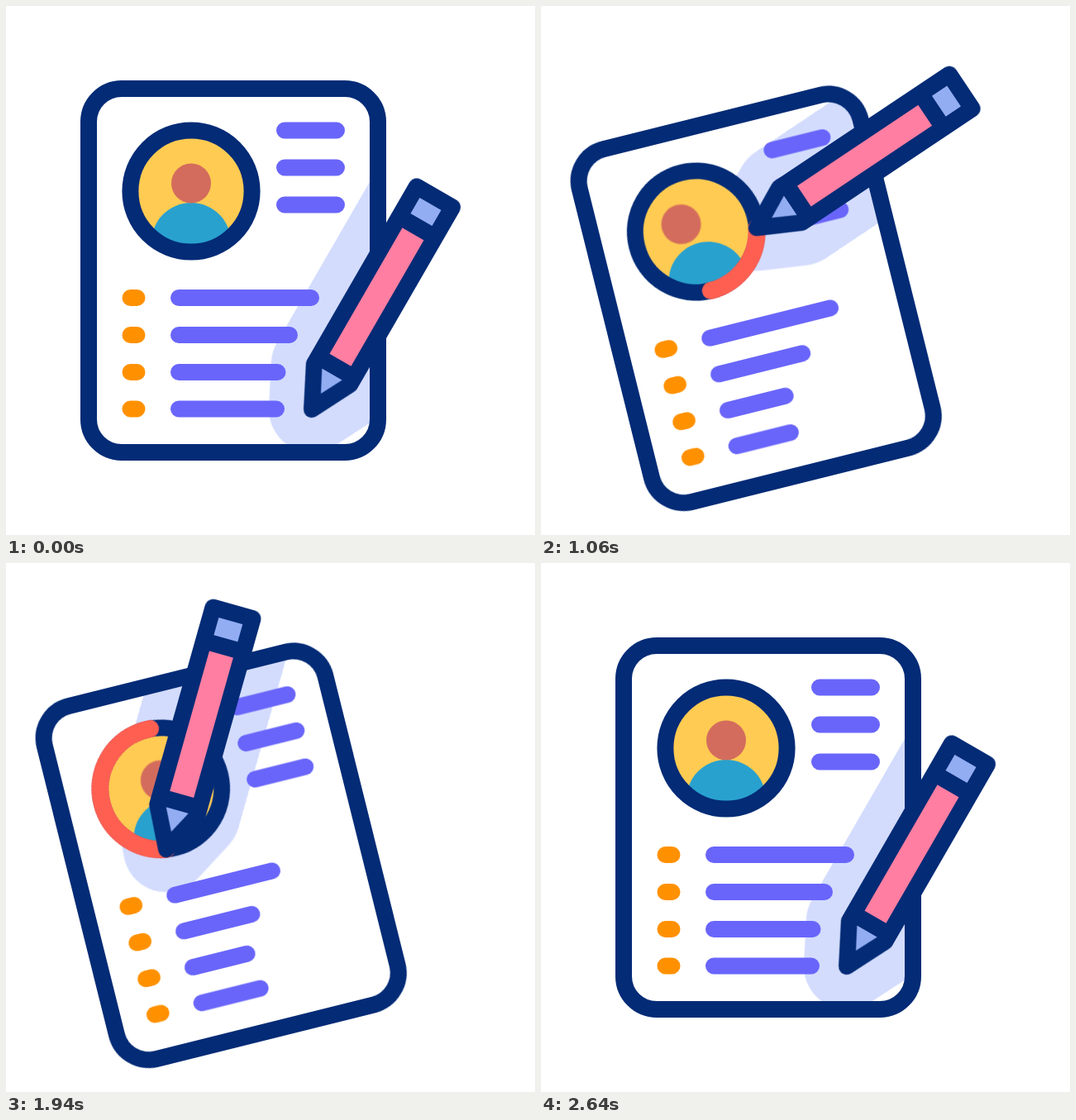
An HTML page that plays this animation: 640 px wide and 640 px high, repeating every 3000 ms.

```html
<!DOCTYPE html>
<html lang="en">
<head>
<meta charset="utf-8">
<title>Editing a profile</title>
<style>
  html, body { margin: 0; width: 100%; height: 100%; overflow: hidden; background: #fff; }
  svg { display: block; width: 100vw; height: 100vh; }

  :root { --navy: #032b76; --shade: #d3dcfd; }
  .line { fill: none; stroke-width: 20; stroke-linecap: round; }
  .ink { stroke: var(--navy); }
  .bars { stroke: #6965fa; }
  .dots { stroke: #ff9100; }
  .trace { stroke: #ff5f51; stroke-width: 21; }
  .pen-body { fill: var(--navy); stroke: var(--navy); stroke-width: 20; stroke-linejoin: round; }
  .pen-shade { fill: var(--shade); stroke: var(--shade); stroke-width: 104; stroke-linejoin: round; }

  .page, .unpage, .head, .tilt, .bars .long {
    animation: 3s cubic-bezier(.333, 0, .667, 1) infinite;
  }
  .leg, .orbit, .unorbit { animation: 3s linear infinite; }

  /* sheet tilt, and its exact inverse for the shadow inside it */
  .page, .unpage { transform-origin: 275px 320px; }
  .page { animation-name: page; }
  .unpage { animation-name: unpage; }
  @keyframes page {
    0%, 6.667%, 87.33%, 100% { transform: translate(0px, 0px) rotate(0deg); }
    23.333%, 70% { transform: translate(-14.8px, 33.8px) rotate(-14deg); }
  }
  @keyframes unpage {
    0%, 6.667%, 87.33%, 100% { transform: rotate(0deg) translate(0px, 0px); }
    23.333%, 70% { transform: rotate(14deg) translate(14.8px, -33.8px); }
  }

  .head { animation-name: head; }
  @keyframes head {
    0%, 6.667%, 68.33%, 100% { transform: translate(0px, 0px); }
    23.333% { transform: translate(-1.8px, -23px); }
    36% { transform: translate(-15.4px, -3.4px); }
    53.333% { transform: translate(12.4px, -4.6px); }
  }

  /* pencil: straight in, once round the ring, straight out */
  .leg { animation-name: leg; }
  .orbit { animation-name: orbit; }
  .unorbit { animation-name: unorbit; }
  .tilt { animation-name: tilt; }
  @keyframes leg {
    0%, 6.667% { transform: translate(162.8px, 144.1px); }
    26.93%, 65.67% { transform: translate(0px, 0px); }
    88%, 100% { transform: translate(164.7px, 143.6px); }
  }
  @keyframes orbit {
    0%, 26.93% { transform: rotate(74.5deg); }
    65.67%, 100% { transform: rotate(-284deg); }
  }
  @keyframes unorbit {
    0%, 26.93% { transform: rotate(-74.5deg); }
    65.67%, 100% { transform: rotate(284deg); }
  }
  @keyframes tilt {
    0%, 6.667% { transform: rotate(30deg); }
    26.93% { transform: rotate(53deg); }
    46.667% { transform: rotate(61.3deg); }
    65.67% { transform: rotate(15.4deg); }
    88%, 100% { transform: rotate(30deg); }
  }

  /* red stroke: the end follows the pencil, the start catches up later */
  .trace { animation: trace 3s linear infinite, show 3s step-end infinite; }
  @keyframes trace {
    0%, 26.93% { stroke-dasharray: .4px, 200px; stroke-dashoffset: 0px; }
    43.333% { stroke-dasharray: 42.6px, 200px; stroke-dashoffset: 0px; }
    65.67% { stroke-dasharray: 48.9px, 200px; stroke-dashoffset: -51.1px; }
    87%, 100% { stroke-dasharray: 0px, 200px; stroke-dashoffset: -100px; }
  }
  @keyframes show {
    0%, 87%, 100% { opacity: 0; }
    26.93% { opacity: 1; }
  }

  /* text bars shorten twice, each later than the one above */
  .b1 { stroke-dasharray: 160px 999px; animation-name: dip1 !important; }
  .b2 { stroke-dasharray: 134px 999px; animation-name: dip2 !important; }
  .b3 { stroke-dasharray: 119.5px 999px; animation-name: dip3 !important; }
  .b4 { stroke-dasharray: 118px 999px; animation-name: dip4 !important; }
  @keyframes dip1 {
    0%, 7.17%, 39.83%, 43.6%, 75.27%, 100% { stroke-dashoffset: 0px; }
    23.5%, 59.43% { stroke-dashoffset: 52px; }
  }
  @keyframes dip2 {
    0%, 11.63%, 44.3%, 46.57%, 78.23%, 100% { stroke-dashoffset: 0px; }
    27.97%, 62.4% { stroke-dashoffset: 52px; }
  }
  @keyframes dip3 {
    0%, 16.1%, 48.77%, 49.53%, 81.2%, 100% { stroke-dashoffset: 0px; }
    32.43%, 65.37% { stroke-dashoffset: 52px; }
  }
  @keyframes dip4 {
    0%, 20.57%, 52.8%, 84.17%, 100% { stroke-dashoffset: 0px; }
    36.9%, 68.33% { stroke-dashoffset: 52px; }
  }
</style>
</head>
<body>
<svg viewBox="0 0 640 640">
  <defs>
    <clipPath id="sheet"><rect x="100" y="100" width="350" height="440" rx="40"/></clipPath>
    <clipPath id="face"><circle cx="224" cy="224" r="66"/></clipPath>
    <path id="pen" d="M0 0L25 -49V-297H-25V-49Z"/>
  </defs>

  <g class="page">
    <rect x="100" y="100" width="350" height="440" rx="40" fill="#fff"/>
    <g clip-path="url(#sheet)">
      <g class="unpage">
        <g transform="translate(187.5 273)">
          <g class="leg"><g class="orbit"><g transform="translate(73.6 0)">
            <g class="unorbit"><g class="tilt">
              <use href="#pen" class="pen-shade"/>
            </g></g>
          </g></g></g>
        </g>
      </g>
    </g>

    <g class="line bars">
      <path d="M337 150.5h63M337 195.5h63M337 240.5h63"/>
      <path class="long b1" d="M209 353h160"/>
      <path class="long b2" d="M209 398h134"/>
      <path class="long b3" d="M209 443h119.5"/>
      <path class="long b4" d="M209 487.5h118"/>
    </g>
    <path class="line dots" d="M150.5 353h8M150.5 398h8M150.5 443h8M150.5 487.5h8"/>

    <circle cx="224" cy="224" r="70" fill="#ffcb52"/>
    <g clip-path="url(#face)">
      <circle cx="224" cy="286" r="48" fill="#29a1ce"/>
      <circle class="head" cx="224" cy="214.5" r="24" fill="#d46c5d"/>
    </g>
    <circle class="line ink" cx="224" cy="224" r="73.6"/>
    <path class="line trace" pathLength="100"
      d="M224 297.6A73.6 73.6 0 0 0 224 150.4A73.6 73.6 0 0 0 224 297.6"/>
    <rect class="line ink" x="100" y="100" width="350" height="440" rx="40"/>
  </g>

  <g transform="translate(187.5 273)">
    <g class="leg"><g class="orbit"><g transform="translate(73.6 0)">
      <g class="unorbit"><g class="tilt">
        <use href="#pen" class="pen-body"/>
        <rect x="-15" y="-287" width="30" height="22" fill="#93adf3"/>
        <rect x="-15" y="-245" width="30" height="176" fill="#ff7ea1"/>
        <path d="M-14 -49H14L0 -22Z" fill="#93adf3"/>
      </g></g>
    </g></g></g>
  </g>
</svg>
</body>
</html>
```
